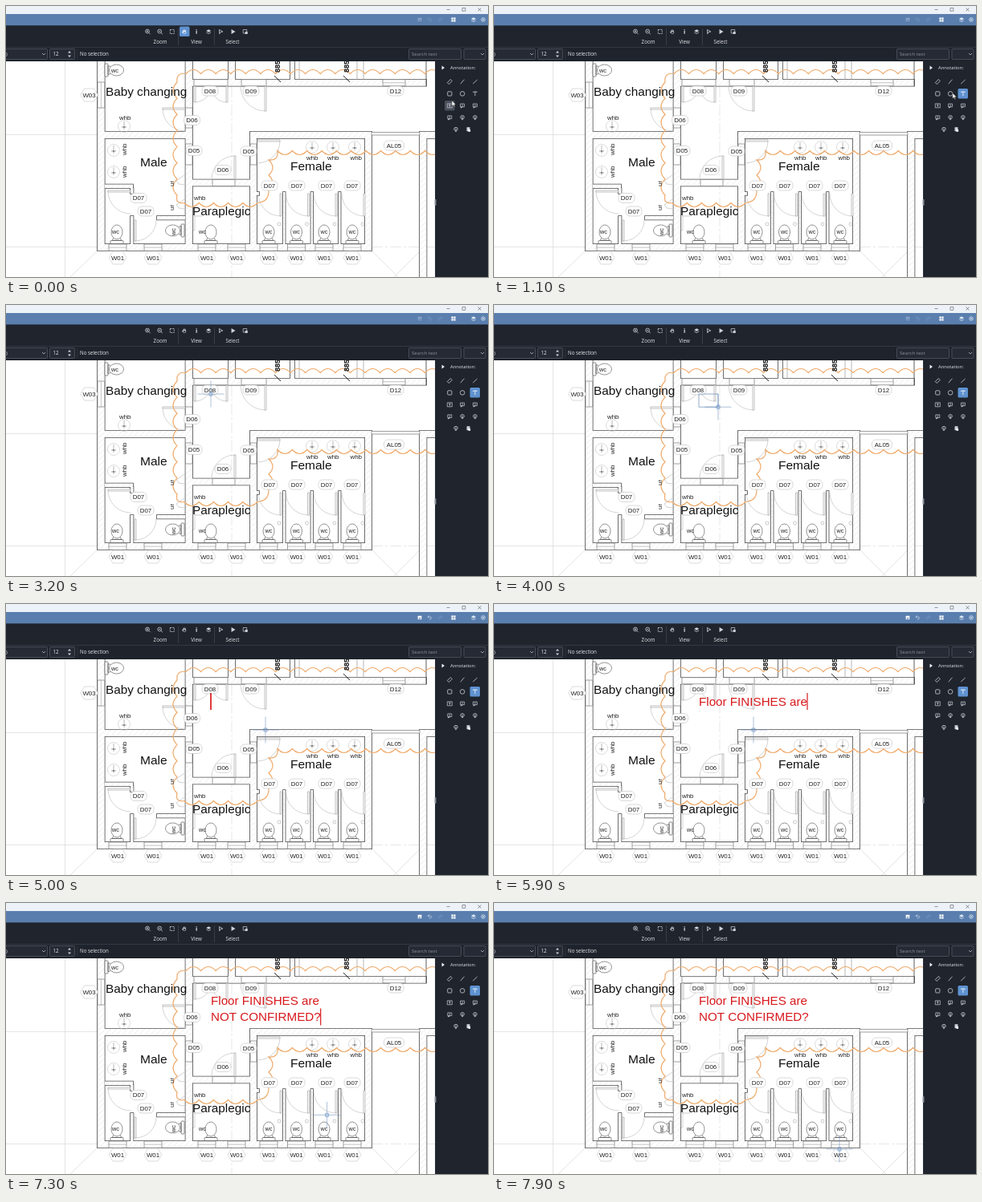
Write an HTML page with a canvas that moves like this. It is 600 px wide and 338 px high and loops after 8000 ms.

```html
<!DOCTYPE html>
<html lang="en">
<head>
<meta charset="utf-8">
<title>Plan annotation</title>
<style>
html, body { margin: 0; width: 100%; height: 100%; overflow: hidden; background: #1f242d; }
canvas { display: block; width: 600px; height: 338px; }
</style>
</head>
<body>
<canvas id="stage"></canvas>
<script>
const W = 600, H = 338, LOOP = 8000, TAU = Math.PI * 2;
const PLAN_FONT = '"Liberation Sans", Arial, sans-serif';
const UI_FONT = '"Open Sans", "Noto Sans", sans-serif';
const ratio = window.devicePixelRatio || 1;
const stage = document.getElementById('stage');

function setup(canvas) {
  canvas.width = W * ratio;
  canvas.height = H * ratio;
  const context = canvas.getContext('2d');
  context.scale(ratio, ratio);
  return context;
}

const screen = setup(stage);
const backdrop = document.createElement('canvas');
let g = setup(backdrop);

function box(x, y, w, h, fill, stroke, lw = 0.7, r = 0) {
  g.beginPath();
  g.roundRect(x, y, w, h, r);
  if (fill) { g.fillStyle = fill; g.fill(); }
  if (stroke) { g.strokeStyle = stroke; g.lineWidth = lw; g.stroke(); }
}

function path(points, color, lw = 0.7, fill) {
  g.beginPath();
  points.forEach(([x, y], i) => i ? g.lineTo(x, y) : g.moveTo(x, y));
  if (fill) { g.closePath(); g.fillStyle = fill; g.fill(); }
  if (color) { g.strokeStyle = color; g.lineWidth = lw; g.stroke(); }
}

const line = (x1, y1, x2, y2, color, lw) => path([[x1, y1], [x2, y2]], color, lw);

function oval(x, y, rx, ry, color, lw = 0.6, fill) {
  g.beginPath();
  g.ellipse(x, y, rx, ry, 0, 0, TAU);
  if (fill) { g.fillStyle = fill; g.fill(); }
  if (color) { g.strokeStyle = color; g.lineWidth = lw; g.stroke(); }
}

function text(s, x, y, size, color, { align = 'left', font = PLAN_FONT, weight = '', turn = 0 } = {}) {
  g.save();
  g.translate(x, y);
  g.rotate(turn);
  g.font = `${weight} ${size}px ${font}`;
  g.textAlign = align;
  g.fillStyle = color;
  g.fillText(s, 0, 0);
  g.restore();
}

// ---- floor plan ----
const INK = '#4a4a4a', SOFT = '#999', PALE = '#d8d8d8';
const STALLS = [327, 361.5, 396, 431];
const WINDOWS = [139, 183, 250, 287, ...STALLS];

const WALLS = [
  [114, 60, 8.7, 245], [114, 297, 341, 8.3], [122, 156.7, 110, 8.3], [223.5, 60, 8.5, 245],
  [232, 91.7, 291, 8], [232, 216.5, 72, 8], [304, 156.7, 8, 148], [304, 156.7, 151, 8.3],
  [447, 164, 8, 141], [515, 164.5, 8.5, 180], [515, 156.7, 30, 8.3], [277, 60, 8, 32], [354, 60, 5, 32],
  [123, 222.5, 35, 4.5], [155, 227, 3.5, 7], [155, 262, 3.5, 36], [188, 262, 35, 4.5],
  [345, 232, 2.6, 65], [379.5, 232, 2.6, 65], [414, 232, 2.6, 65], [312, 232, 3, 4]
];

function drawWalls() {
  const trace = () => { g.beginPath(); WALLS.forEach(w => g.rect(...w)); };
  trace();
  g.strokeStyle = INK;
  g.lineWidth = 1.6;
  g.stroke();
  g.fillStyle = '#fff';
  g.fill();
  g.save();
  g.clip();
  for (let x = -260; x < 560; x += 7) line(x, 338, x + 278, 60, '#dcdcdc', 0.5);
  g.restore();
}

function opening(x, y, w, h, glazed) {
  box(x, y, w, h, '#fff', '#777', 0.7);
  if (!glazed) return;
  if (w > h) line(x, y + h / 2, x + w, y + h / 2, SOFT, 0.6);
  else line(x + w / 2, y, x + w / 2, y + h, SOFT, 0.6);
}

// A leaf leaves the hinge at angle a; its swing ends at angle b (quarter turns).
function door(x, y, r, a, b) {
  const A = a * Math.PI / 2, B = b * Math.PI / 2;
  g.beginPath();
  g.arc(x, y, r, A, B, b < a);
  g.strokeStyle = '#b8b8b8';
  g.lineWidth = 0.6;
  g.stroke();
  g.save();
  g.translate(x, y);
  g.rotate(A);
  box(0, -1, r, 2, '#fff', SOFT, 0.6);
  g.restore();
}

function toilet(x, y, turn = 0) {
  g.save();
  g.translate(x, y);
  g.rotate(turn);
  box(-8, 9, 16, 4, '#fff', '#555', 0.7, 1);
  oval(0, -1.5, 7, 9, '#666', 0.7, '#fff');
  path([[-4.5, 6], [-5.5, 9], [5.5, 9], [4.5, 6]], '#555', 0.7);
  g.restore();
}

function sink(x, y, r = 7.5) {
  oval(x, y, r, r, '#c4c4c4', 0.6);
  line(x - 3, y + 1, x + 3, y + 1, '#666', 0.6);
  line(x, y - 6, x, y + 4, '#888', 0.6);
  oval(x, y + 1, 0.8, 0.8, null, 0, INK);
}

function tag(s, x, y, w = 20) {
  box(x - w / 2, y - 6, w, 12, '#fff', '#c0c0c0', 0.6, 5);
  text(s, x, y + 2.8, 7.9, '#222', { align: 'center' });
}

function windowTag(s, x, y) {
  path([[-11, 0], [-6, -8], [6, -8], [11, 0], [6, 8], [-6, 8], [-11, 0]].map(([a, b]) => [x + a, y + b]), '#c4c4c4', 0.6, '#fff');
  text(s, x, y + 2.8, 7.9, '#222', { align: 'center' });
}

// Points run clockwise, so each bump bulges out to the left of travel.
function cloud(points, size, depth) {
  g.beginPath();
  g.moveTo(...points[0]);
  for (let i = 1; i < points.length; i++) {
    const [x0, y0] = points[i - 1], [x1, y1] = points[i];
    const dx = x1 - x0, dy = y1 - y0, len = Math.hypot(dx, dy);
    const n = Math.max(1, Math.round(len / size)), bulge = 2 * depth / len;
    for (let k = 0; k < n; k++) {
      const mid = (k + 0.5) / n, end = (k + 1) / n;
      g.quadraticCurveTo(x0 + dx * mid + dy * bulge, y0 + dy * mid - dx * bulge, x0 + dx * end, y0 + dy * end);
    }
  }
  g.strokeStyle = '#efab6c';
  g.lineWidth = 1.2;
  g.stroke();
}

function drawPlan() {
  g.save();
  g.beginPath();
  g.rect(0, 69, 534, 269);
  g.clip();
  box(0, 69, 534, 269, '#fff');

  line(73.5, 69, 73.5, 338, PALE, 0.7);
  line(0, 160.5, 114, 160.5, PALE, 0.7);
  line(0, 300.5, 114, 300.5, PALE, 0.7);
  line(80, 338, 114, 305, PALE, 0.7);
  line(455, 305, 488, 338, PALE, 0.7);
  line(515, 306, 483, 338, PALE, 0.7);
  g.setLineDash([14, 3, 3, 3]);
  line(281, 100, 281, 338, PALE, 0.6);
  line(455, 300.5, 534, 300.5, PALE, 0.6);
  g.setLineDash([]);

  drawWalls();
  [[223.5, 127, 8.5, 25], [223.5, 172, 8.5, 26], [304, 172, 8, 26], [257, 216.5, 28, 8],
   [234, 91.7, 42, 8], [293, 91.7, 31, 8]].forEach(o => opening(...o));
  WINDOWS.forEach(x => opening(x - 11, 297, 22, 8.3, true));
  opening(469, 91.7, 28, 8, true);
  opening(114, 95, 8.7, 32, true);
  opening(455, 157.5, 60, 3.5);
  line(523, 69, 523, 100, INK, 0.9);
  [365, 437, 445].forEach(x => line(x, 69, x, 92, SOFT, 0.7));

  door(223, 128, 28, 2, 1);
  door(285, 216, 29, 3, 2);
  door(235, 100, 20, 1, 0);
  door(275, 100, 20, 1, 2);
  door(323, 100, 31, 1, 2);
  door(313, 168, 28, 0, 1);
  door(155, 231, 28, 2, 1);
  door(161, 267, 26, 1, 0);
  STALLS.forEach(x => {
    door(x + 15, 234, 28, 1, 2);
    toilet(x, 283.5);
    oval(x + 13, 272, 2, 2, SOFT, 0.5);
    text('wc', x, 284, 7.3, '#222', { align: 'center' });
  });
  toilet(138, 283.5);
  toilet(255, 283.5);
  toilet(136, 80, Math.PI / 2);
  toilet(209, 280, -Math.PI / 2);
  text('wc', 132, 284, 7.3, '#222');
  text('wc', 240, 284, 7.3, '#222');
  text('wc', 131, 83, 7.3, '#222');
  text('wc', 211, 286, 7.3, '#222', { turn: -Math.PI / 2 });
  [[134, 180], [134, 207], [381, 176], [407, 176], [434, 176], [147, 150]].forEach(s => sink(...s));
  [217, 247].forEach(y => {
    path([[222, y - 6], [212, y + 1], [215, y + 5], [222, y + 6]], '#b4b4b4', 0.6);
  });
  box(233, 250, 2, 30, '#fff', '#aaa', 0.5);
  line(234, 262, 244, 262, '#aaa', 0.6);

  cloud([[540, 180.5], [338, 180.5], [327, 192], [327, 230], [313, 245.5], [222, 245.5], [213, 236],
    [213, 95], [224, 84.5], [540, 84.5]], 19, 5);

  [338, 424].forEach(x => {
    text('885', x + 3, 83, 9, '#111', { weight: 'bold', turn: -Math.PI / 2 });
    line(x - 4, 87, x + 4, 95, '#111', 0.9);
  });

  text('Baby changing', 124, 111.5, 15.3, '#111');
  text('Male', 167, 199.5, 15.5, '#111');
  text('Female', 354, 204.5, 15.5, '#111');
  text('Paraplegic', 232, 260.8, 15.3, '#111');
  [[141, 142], [234, 242], [374, 192], [400, 192], [428.5, 192]].forEach(([x, y]) => text('whb', x, y, 7.9, '#222'));
  [[150, 186], [150, 214]].forEach(([x, y]) => text('whb', x, y, 7.9, '#222', { turn: -Math.PI / 2 }));
  [225, 255].forEach(y => text('ur', 209, y, 7.9, '#222', { turn: -Math.PI / 2 }));

  [['D08', 254, 106], ['D09', 305, 106], ['D12', 485, 106], ['D06', 231.5, 142.5], ['D05', 234, 180.5],
   ['D05', 302, 181], ['D06', 270, 204.5], ['D07', 165, 239.5], ['D07', 174, 256],
   ['D07', 328, 224], ['D07', 362, 224], ['D07', 399, 224], ['D07', 431, 224]].forEach(t => tag(...t));
  tag('AL05', 483, 174, 25);
  windowTag('W03', 103.5, 111);
  WINDOWS.forEach(x => windowTag('W01', x, 314));
  g.restore();
}

// ---- application frame ----
const ICON = '#cdd2da', BLUE = '#5a7fae', FIELD = '#252a34';

function glyph(kind, x, y, c = ICON) {
  const l = (...p) => path(p.map(([a, b]) => [x + a, y + b]), c, 0.8);
  switch (kind) {
    case 'in': case 'out':
      oval(x - 0.5, y - 0.5, 2.4, 2.4, c, 0.8);
      l([1.3, 1.3], [3.2, 3.2]);
      l([-1.7, -0.5], [0.7, -0.5]);
      if (kind === 'in') l([-0.5, -1.7], [-0.5, 0.7]);
      break;
    case 'fit':
      g.setLineDash([2, 1]);
      box(x - 2.5, y - 2.5, 5, 5, null, c, 0.8);
      g.setLineDash([]);
      break;
    case 'hand':
      box(x - 1.6, y - 0.3, 3.4, 2.8, null, c, 0.6, 1);
      for (let i = 0; i < 4; i++) box(x - 1.8 + i, y - 2.8 + Math.abs(i - 1.5) * 0.5, 0.6, 3, c);
      l([-3, 0], [-1.5, 1.8]);
      break;
    case 'info':
      box(x - 0.6, y - 1, 1.3, 3.8, c);
      oval(x, y - 2.3, 0.7, 0.7, null, 0, c);
      break;
    case 'layers':
      path([[x, y - 2.7], [x + 3, y - 1], [x, y + 0.7], [x - 3, y - 1]], null, 0, c);
      l([-2.8, 1], [0, 2.5], [2.8, 1]);
      break;
    case 'pick': l([-2, -2.5], [2.5, 0], [-0.5, 0.6], [-1.6, 2.8], [-2, -2.5]); break;
    case 'arrow': path([[x - 2, y - 3], [x + 3, y], [x - 2, y + 3]], null, 0, c); break;
    case 'area': box(x - 2.5, y - 2.5, 4.5, 4.5, null, c); box(x, y, 3, 3, c); break;
    case 'ruler': path([[x - 3, y + 1], [x + 1, y - 3], [x + 3, y - 1], [x - 1, y + 3], [x - 3, y + 1]], c, 0.8); break;
    case 'curve': l([-2.5, 2.5], [-0.5, 0.8], [0.2, -0.8], [2.5, -2.5]); break;
    case 'line': l([-2.7, 2.5], [2.7, -2.5]); break;
    case 'square': box(x - 2.6, y - 2.6, 5.2, 5.2, null, c, 0.8, 1); break;
    case 'circle': oval(x, y, 2.8, 2.8, c, 0.8); break;
    case 'T': l([-2.3, -1.5], [-2.3, -2.4], [2.3, -2.4], [2.3, -1.5]); l([0, -2.4], [0, 2.7]); break;
    case 'frame': box(x - 3, y - 2.5, 6, 5, null, c); l([-1.3, -1], [1.3, -1]); l([0, -1], [0, 1.6]); break;
    case 'note': box(x - 2.5, y - 2.3, 5, 3.7, null, c); l([-1.5, 1.5], [-2, 2.8], [0.5, 1.5]); l([0, -1.5], [0, 0.5]); break;
    case 'stamp': oval(x, y - 0.6, 2.3, 2, c, 0.8); l([-1, 2.4], [1, 2.4]); l([0, -1.5], [0, 1]); break;
    case 'page': box(x - 2, y - 2.8, 4, 5, c); box(x, y, 2.6, 2.8, '#fff'); break;
    case 'save': box(x - 2.3, y - 2.3, 4.6, 4.6, c, null, 0, 0.6); box(x - 1.2, y + 0.2, 2.4, 1.3, BLUE); break;
    case 'undo': case 'redo': {
      const s = kind === 'undo' ? 1 : -1;
      l([-2.5 * s, -1], [1 * s, -1], [2.3 * s, 0.3], [1 * s, 2], [-0.5 * s, 2]);
      l([-1 * s, -2.5], [-2.5 * s, -1], [-1 * s, 0.5]);
      break;
    }
  }
}

const PANEL = [
  ['ruler', 'curve', 'line'], ['square', 'circle', 'T'], ['frame', 'note', 'note'], ['note', 'stamp', 'stamp']
];

function drawFrame() {
  const ui = { font: UI_FONT }, mid = { font: UI_FONT, align: 'center' };
  const field = (x, w) => box(x, 53.5, w, 13, FIELD, '#565c68', 0.7, 1);
  box(0, 0, W, 10, '#edf2f9');
  line(548.5, 4.5, 552.5, 4.5, '#555', 0.6);
  box(568, 2.5, 3.8, 3.8, null, '#555', 0.6);
  line(587.5, 2.5, 591.5, 6.5, '#444', 0.6);
  line(591.5, 2.5, 587.5, 6.5, '#444', 0.6);
  box(0, 10, W, 14.5, BLUE);
  [[-2.6, -2.6], [0.3, -2.6], [-2.6, 0.3], [0.3, 0.3]].forEach(([a, b]) => box(557 + a, 17 + b, 2.3, 2.3, '#fff'));
  glyph('layers', 582, 17, '#dce8f4');
  oval(594, 17, 2.3, 2.3, '#dce8f4', 0.8);
  oval(594, 17, 0.9, 0.9, null, 0, '#dce8f4');

  box(0, 24.5, W, 27, '#20242d');
  box(0, 51.5, W, 17.5, '#1f232c');
  line(0, 51.5, W, 51.5, '#3a404b', 0.7);
  ['in', 'out', 'fit', null, 'info', 'layers', 'pick', 'arrow', 'area']
    .forEach((k, i) => k && glyph(k, 176.5 + i * 15.15, 32));
  [['Zoom', 192], ['View', 237], ['Select', 282]].forEach(([s, x]) => text(s, x, 47.4, 6.2, '#e2e5ea', mid));
  [214.5, 259.5].forEach(x => line(x, 28, x, 49, '#4a505c', 0.6));

  field(-5, 56.5);
  text(')', 0, 62, 6, '#e2e5ea', ui);
  path([[45, 59], [47, 61], [49, 59]], ICON);
  field(54.5, 31);
  text('12', 58.5, 62.2, 6.2, '#e8ebef', ui);
  path([[77, 58.5], [79, 56], [81, 58.5]], null, 0, ICON);
  path([[77, 61.5], [79, 64], [81, 61.5]], null, 0, ICON);
  line(89, 54, 89, 66, '#3a404b', 0.6);
  text('No selection', 92, 62.2, 6.2, '#e8ebef', ui);
  field(501.5, 65);
  text('Search text', 505, 62.2, 6.1, '#8b919b', ui);
  field(570, 27);
  path([[591, 59], [593, 61], [595, 59]], ICON);

  box(534, 69, 66, 269, '#1f242d');
  line(534.5, 69, 534.5, 338, '#343a45', 0.7);
  box(533.5, 241, 2, 8, '#8a909a', null, 0, 1);
  path([[542.5, 74.5], [546, 77], [542.5, 79.5]], null, 0, '#eef0f3');
  text('Annotation:', 553, 79.3, 5.8, '#e8ebef', ui);
  PANEL.forEach((row, r) => row.forEach((k, c) => glyph(k, 552.3 + c * 15.8, 94.5 + r * 14.9)));
  glyph('stamp', 560, 154);
  glyph('page', 575.5, 154);
}

drawPlan();
drawFrame();
g = screen;

// ---- motion ----
const LINES = ['Floor FINISHES are', 'NOT CONFIRMED?'];
const RED = '#d8191c', ACTIVE = '#5f92d0';
const TOOL = [583, 109], HOVER = [234, 96], START = [255, 111], CORNER = [323, 157], REST = [430, 307];

const ease = p => p * p * (3 - 2 * p);
function glide(t, t0, t1, from, to) {
  const p = ease(Math.min(1, Math.max(0, (t - t0) / (t1 - t0))));
  return from.map((v, i) => v + (to[i] - v) * p);
}

function pointer([x, y]) {
  path([[0, 0], [0, 7], [1.7, 5.5], [2.9, 8], [3.9, 7.5], [2.8, 5.1], [5, 5]].map(([a, b]) => [x + a, y + b]), '#222', 0.5, '#fff');
}

function crosshair([x, y]) {
  g.save();
  g.beginPath();
  g.rect(0, 69, 534, 269);
  g.clip();
  g.globalAlpha = 0.75;
  line(x - 16.5, y, x + 16.5, y, '#6488b4', 0.7);
  line(x, y - 16.5, x, y + 16.5, '#6488b4', 0.7);
  box(x - 2, y - 2, 4, 4, null, '#4d7fc0', 0.8);
  g.restore();
}

function drawNote(t) {
  const count = Math.max(0, Math.floor((t - 5050) / 47));
  const row = count > LINES[0].length ? 1 : 0;
  const typed = [LINES[0].slice(0, count), LINES[1].slice(0, Math.max(0, count - LINES[0].length - 1))];
  typed.forEach((s, i) => text(s, 255, 126.8 + i * 20.4, 15.2, RED));
  if (t >= 7400) return;
  g.font = `15.2px ${PLAN_FONT}`;
  const x = 255 + g.measureText(typed[row]).width;
  line(x, 111 + row * 20.4, x, 132 + row * 20.4, RED, count ? 1.2 : 1.7);
}

function drawCursor(t) {
  if (t < 1000) return pointer(glide(t, 0, 700, [555, 118], TOOL));
  if (t < 1900) {
    const at = glide(t, 1000, 1900, TOOL, HOVER);
    return at[0] > 534 ? pointer(at) : crosshair(at);
  }
  if (t < 3500) return crosshair(glide(t, 1900, 3200, HOVER, START));
  if (t < 5000) {
    const at = glide(t, 3500, 4750, START, CORNER);
    box(...START, at[0] - START[0], at[1] - START[1], null, '#6488b4', 0.7);
    return crosshair(at);
  }
  crosshair(glide(t, 6750, 7600, CORNER, REST));
}

function draw(t) {
  g.drawImage(backdrop, 0, 0, W, H);

  const picked = t >= 900, edited = t >= 5000;
  if (!picked) box(216, 25.5, 12.5, 12.5, ACTIVE, null, 0, 1.5);
  glyph('hand', 222, 32, picked ? ICON : '#fff');
  if (picked) {
    box(577.5, 103, 12.5, 12.5, ACTIVE, null, 0, 1.5);
    glyph('T', 583.9, 109.4, '#fff');
  }
  if (t < 250) {
    box(546, 118, 12.5, 12.5, '#4a505b', null, 0, 1.5);
    glyph('frame', 552.3, 124.3);
  }
  glyph('save', 515, 17, edited ? '#fff' : '#86a3c8');
  glyph('undo', 527.5, 17, edited ? '#c4d4e6' : '#7896bf');
  glyph('redo', 540.5, 17, '#7896bf');

  drawCursor(t);
  if (edited) drawNote(t);
}

function tick(now) {
  draw(now % LOOP);
  requestAnimationFrame(tick);
}
requestAnimationFrame(tick);
</script>
</body>
</html>
```
